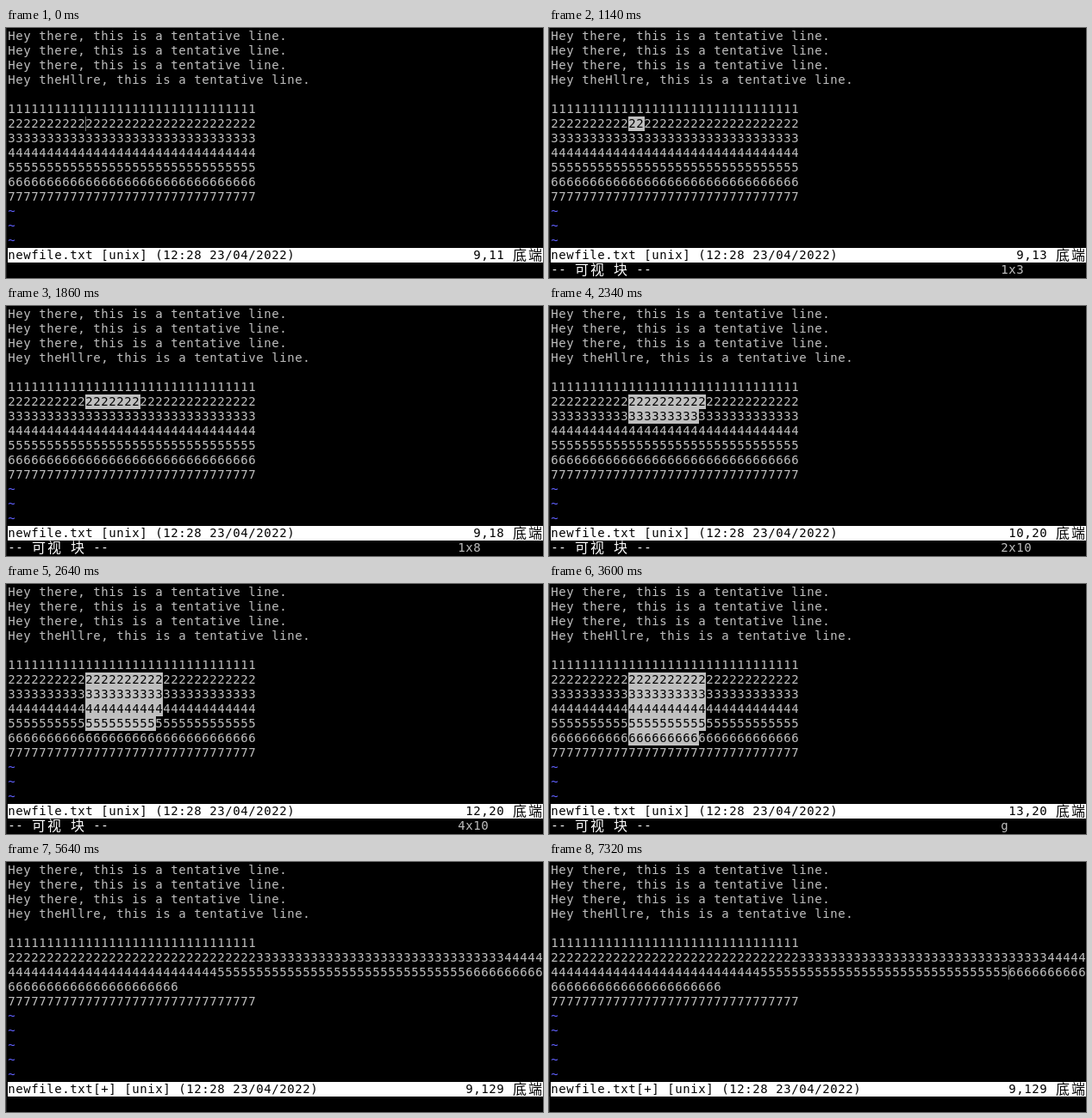
Recreate the animation shown at these times as an HTML page with a canvas. Size 623 by 291 pixels, loop 7440 ms.

```html
<!DOCTYPE html>
<html lang="zh">
<head>
<meta charset="utf-8">
<title>Block selection join</title>
<style>
  html, body { margin: 0; width: 100%; height: 100%; overflow: hidden; background: #000; }
  canvas { display: block; width: 623px; height: 291px; }
</style>
</head>
<body>
<canvas id="screen" width="623" height="291"></canvas>
<script>
const ctx = document.getElementById('screen').getContext('2d');
const W = 623, H = 291, LOOP = 7440;
const CW = 9, CH = 17, LEFT = 2, TOP = 1, COLS = 69;
const GREY = '#bfbfbf', BLUE = '#6060ff';
const MONO = '14px "DejaVu Sans Mono", "Noto Sans Mono", monospace';
const CJK = '300 16px "Noto Sans CJK SC", "Noto Sans CJK", sans-serif';

const STATUS_ROW = 15, MODE_ROW = 16;
const START_ROW = 6, START_COL = 10;

// Key presses, in ms
const RIGHT_KEYS = [960, 1140, 1260, 1440, 1560, 1740, 1860, 1980, 2100];
const DOWN_KEYS = [2340, 2460, 2640, 2760];
const VISUAL_AT = 660, G_AT = 3600, JOIN_AT = 4080;
const HIDDEN = [[3300, 3600], [4620, 5100], [5640, 6120], [6660, 7140]];

const pressed = (keys, t) => keys.filter(k => k <= t).length;
const digits = d => String(d).repeat(32);
const cellX = col => LEFT + col * CW;
const cellY = row => TOP + row * CH;

const intro = [
  ...Array(3).fill('Hey there, this is a tentative line.'),
  'Hey theHllre, this is a tentative line.',
  '',
  digits(1)
];
const separate = [...intro, ...[2, 3, 4, 5, 6, 7].map(digits)];
const longLine = [2, 3, 4, 5, 6].map(digits).join('');
const joined = [...intro, ...longLine.match(new RegExp(`.{1,${COLS}}`, 'g')), digits(7)];

function fillCells(row, col, count, color) {
  ctx.fillStyle = color;
  ctx.fillRect(cellX(col), cellY(row), count * CW, CH);
}

// Terminal text: each glyph is centred in its cell, wide ones take two cells
function write(text, row, col, color) {
  ctx.fillStyle = color;
  ctx.textAlign = 'center';
  for (const ch of text) {
    const span = ch > '\u2e80' ? 2 : 1;
    ctx.font = span === 2 ? CJK : MONO;
    ctx.fillText(ch, cellX(col) + span * CW / 2, cellY(row) + 12 + span);
    col += span;
  }
}

function drawBuffer(lines) {
  lines.forEach((line, row) => write(line, row, 0, GREY));
  for (let row = lines.length; row < STATUS_ROW; row++) write('~', row, 0, BLUE);
}

function drawSelection(lines, endRow, endCol) {
  for (let row = START_ROW; row <= endRow; row++) {
    // The cell under the cursor stays plain
    const end = row === endRow ? endCol : endCol + 1;
    if (end === START_COL) continue;
    fillCells(row, START_COL, end - START_COL, GREY);
    write(lines[row].slice(START_COL, end), row, START_COL, '#000');
  }
}

function drawStatus(name, position) {
  ctx.fillStyle = '#fff';
  ctx.fillRect(LEFT, cellY(STATUS_ROW), W - LEFT, CH);
  write(name + ' [unix] (12:28 23/04/2022)', STATUS_ROW, 0, '#000');
  write(position.padStart(5) + ' 底端', STATUS_ROW, 59, '#000');
}

function drawCursor(t, row, col) {
  if (HIDDEN.some(([from, to]) => t >= from && t < to)) return;
  ctx.fillStyle = t < 240 || t >= 7320 ? '#707070' : GREY;
  ctx.fillRect(cellX(col), cellY(row), 1, CH);
}

function draw(t) {
  ctx.fillStyle = '#000';
  ctx.fillRect(0, 0, W, H);
  ctx.fillStyle = '#222';
  ctx.fillRect(0, 0, 1, H);

  if (t >= JOIN_AT) {
    drawBuffer(joined);
    drawStatus('newfile.txt[+]', '9,129');
    drawCursor(t, 7, 59);
    return;
  }

  const right = pressed(RIGHT_KEYS, t), down = pressed(DOWN_KEYS, t);
  const row = START_ROW + down, col = START_COL + right;
  drawBuffer(separate);
  drawStatus('newfile.txt', `${9 + down},${col + 1}`);
  if (t >= VISUAL_AT) {
    drawSelection(separate, row, col);
    write('-- 可视 块 --', MODE_ROW, 0, '#fff');
    write(t >= G_AT ? 'g' : `${down + 1}x${right + 1}`, MODE_ROW, 58, GREY);
  }
  drawCursor(t, row, col);
}

function tick() {
  draw(performance.now() % LOOP);
  requestAnimationFrame(tick);
}
tick();
</script>
</body>
</html>
```
